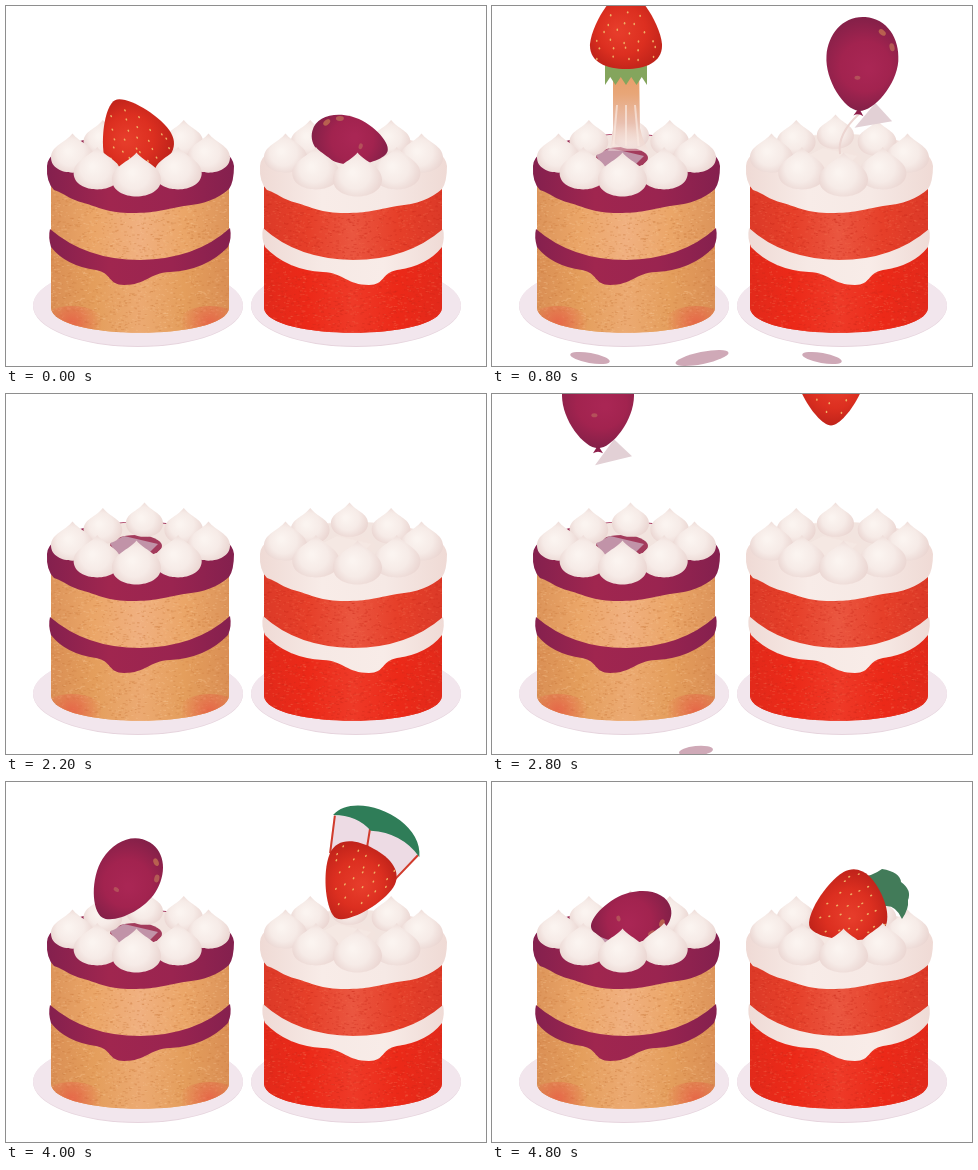
An HTML page with a canvas for the animation above (5 s loop, 480x360 px).

```html
<!DOCTYPE html>
<html lang="en">
<head>
<meta charset="utf-8">
<title>Cake swap</title>
<style>
  html, body { margin: 0; width: 100%; height: 100%; overflow: hidden; background: #fff; }
  canvas { display: block; }
</style>
</head>
<body>
<canvas id="stage" width="480" height="360"></canvas>
<script>
const W = 480, H = 360, LOOP = 5000;
const stage = document.getElementById('stage').getContext('2d');

const clamp = u => Math.max(0, Math.min(1, u));
const mix = (a, b, u) => a + (b - a) * u;

function layer(paint) {
  const canvas = document.createElement('canvas');
  canvas.width = W;
  canvas.height = H;
  paint(canvas.getContext('2d'));
  return canvas;
}

function random(seed) {
  return () => (seed = (seed * 16807) % 2147483647) / 2147483647;
}

function fillPath(c, d, fill) {
  c.fillStyle = fill;
  c.fill(new Path2D(d));
}

function strokePath(c, d, color, width) {
  c.strokeStyle = color;
  c.lineWidth = width;
  c.stroke(new Path2D(d));
}

function oval(c, x, y, rx, ry, fill, rot = 0) {
  c.fillStyle = fill;
  c.beginPath();
  c.ellipse(x, y, rx, ry, rot, 0, Math.PI * 2);
  c.fill();
}

function gradient(c, line, colors) {
  const g = line.length === 4 ? c.createLinearGradient(...line) : c.createRadialGradient(...line);
  colors.forEach((color, i) => g.addColorStop(i / (colors.length - 1), color));
  return g;
}

function at(c, x, y, degrees, paint) {
  c.save();
  c.translate(x, y);
  c.rotate(degrees * Math.PI / 180);
  paint();
  c.restore();
}

// Sponge colours run edge, body, glow; lean shifts the front cream sideways.
const cakes = [
  {
    x: 0, plate: 132, lean: -4, seed: 91,
    upper: ['#dc945a', '#eba668', '#f0b080'], lower: ['#da8f55', '#e49e5c', '#ecaa72'],
    specks: ['#c97a3c', '#f7c48f'], icing: ['#84204e', '#a0264f', '#9a2450', '#84204e'],
    hole: ['#a33b5c', '#c193a8']
  },
  {
    x: 213, plate: 350, lean: 4, seed: 491,
    upper: ['#dc3a28', '#e63f29', '#ea5640'], lower: ['#e22a1b', '#ec2918', '#ee3a28'],
    specks: ['#c92a1b', '#f0684c'], icing: ['#efdad5', '#f8ece8', '#f6e9e5', '#efdad5'],
    hole: ['#f3e4df', '#f5e8e3']
  }
];

function cream(c, x, y, r, tip) {
  const bottom = y + r * 0.8 + 5;
  const fill = gradient(c, [x - r * 0.2, y - r * 0.2, 2, x, y - 2, r * 1.15], ['#fbf4f0', '#f6ebe7', '#e8d1cd']);
  fillPath(c, `M${x} ${tip} C${x + 7} ${tip + 9} ${x + r} ${y - r * 0.45} ${x + r} ${y + 2}
    C${x + r} ${bottom} ${x - r} ${bottom} ${x - r} ${y + 2}
    C${x - r} ${y - r * 0.45} ${x - 7} ${tip + 9} ${x} ${tip}Z`, fill);
}

// Eight dollops sit on an oval ring; those with a positive sine are in front.
function creamRing(c, cake, steps) {
  for (const step of steps) {
    const angle = step * Math.PI / 4, sin = Math.sin(angle), cos = Math.cos(angle);
    const x = cake.x + 134.5 + 68 * Math.sign(cos) * Math.abs(cos) ** 1.5 + cake.lean * sin;
    const y = 149.5 + 22 * sin;
    cream(c, x, y, 21.5 + 3 * sin, y - 22 - 3 * sin);
  }
}

function cakeBase(c, cake) {
  const rand = random(cake.seed);
  const sponge = ([edge, body, glow]) => gradient(c, [44, 0, 223, 0], [edge, body, glow, body, edge]);
  oval(c, cake.plate, 300, 105, 41, '#e6d4dd');
  oval(c, cake.plate, 299.5, 105, 40.5, '#f2e6ed');

  c.save();
  c.translate(cake.x, 0);
  c.save();
  c.clip(new Path2D('M45 170 V302 C48 335 220 335 223 302 V170Z'));
  c.fillStyle = sponge(cake.upper);
  c.fillRect(40, 160, 190, 180);
  fillPath(c, 'M40 232 Q134 286 228 230 V340 H40Z', sponge(cake.lower));
  c.globalAlpha = 0.35;
  for (let i = 0; i < 2400; i++) {
    c.fillStyle = cake.specks[rand() < 0.5 ? 0 : 1];
    c.fillRect(44 + rand() * 180, 180 + rand() * 150, 1 + rand() * 2, 1);
  }
  c.globalAlpha = 1;
  if (cake.x === 0) {
    for (const x of [66, 204]) {
      oval(c, x, 317, 32, 17, gradient(c, [x, 317, 2, x, 317, 30], ['rgba(232,92,68,.75)', 'rgba(232,92,68,0)']));
    }
  }
  c.restore();

  const icing = gradient(c, [41, 0, 228, 0], cake.icing);
  c.save();
  if (cake.x) c.transform(-1, 0, 0, 1, 268, 0);
  fillPath(c, `M44 223 Q80 254 134 254 Q190 253 224 222 Q226 232 222 241 Q200 264 164 266
    C143 267 140 279 118 279 C102 279 106 267 90 264 Q60 260 45 241 Q42 231 44 223Z`, icing);
  c.restore();
  fillPath(c, `M41 160 C44 117 225 117 228 160 Q228 176 223 183 C212 193 198 198 178 200
    C155 204 150 207 126 207 C102 207 92 201 78 197 C62 193 60 188 48 184 Q40 176 41 160Z`, icing);
  oval(c, 134.5, 150, 64, 22, '#f2e4df');
  oval(c, 130, 152, 26, 11, cake.hole[0]);
  fillPath(c, 'M104 149 L118 142 L152 150 L138 164 L110 160Z', cake.hole[1]);
  c.restore();
  creamRing(c, cake, [6, 5, 7, 4, 0]);
}

const backLayer = layer(c => cakes.forEach(cake => cakeBase(c, cake)));
const frontLayer = layer(c => cakes.forEach(cake => creamRing(c, cake, [3, 1, 2])));

function strawberry(c, { x, y, degrees }) {
  const rand = random(77);
  at(c, x, y, degrees, () => {
    fillPath(c, 'M0 -41 C12 -41 34 -8 36 13 C37 31 20 38 0 38 C-20 38 -37 31 -36 13 C-34 -8 -12 -41 0 -41Z',
      gradient(c, [-8, 0, 4, 0, 0, 44], ['#e63c2a', '#dc2f20', '#bb2119']));
    for (let sy = -29; sy < 34; sy += 9) {
      const half = Math.min(30, (sy + 48) * 0.55);
      for (let sx = -half; sx <= half; sx += 14) {
        oval(c, sx + rand() * 5, sy + rand() * 5, 0.8, 1.2, '#eeb066');
      }
    }
  });
}

function grape(c, { x, y, rx, ry, degrees }) {
  at(c, x, y, degrees, () => {
    if (rx > 35) {
      fillPath(c, `M16 ${ry - 9} L-3 ${ry + 17} L34 ${ry + 8}Z`, '#e2d0d5');
      fillPath(c, `M0 ${ry - 3} L-5 ${ry + 5} Q0 ${ry + 2} 5 ${ry + 5}Z`, '#8c1c49');
    }
    fillPath(c, `M0 ${-ry} C${rx * 0.6} ${-ry} ${rx} ${-ry * 0.6} ${rx} ${-ry * 0.12}
      C${rx} ${ry * 0.4} ${rx * 0.4} ${ry} 0 ${ry} C${-rx * 0.4} ${ry} ${-rx} ${ry * 0.4} ${-rx} ${-ry * 0.12}
      C${-rx} ${-ry * 0.6} ${-rx * 0.6} ${-ry} 0 ${-ry}Z`,
      gradient(c, [rx * 0.2, ry * 0.1, 3, 0, 0, ry], ['#a92654', '#a2234f', '#832048']));
    oval(c, rx * 0.5, -ry * 0.7, 4, 2.5, '#b8604f', 0.6);
    oval(c, rx * 0.8, -ry * 0.4, 2.5, 4, '#b45a55', -0.3);
    oval(c, -rx * 0.1, ry * 0.3, 3, 2, '#b4505a');
  });
}

function exhaust(c, { x, y }, t) {
  const top = y + 34;
  c.globalAlpha = clamp((t - 200) / 500);
  fillPath(c, `M${x - 13} ${top} H${x + 13} L${x + 14} 122 Q${x + 18} 140 ${x + 24} 145
    H${x - 18} Q${x - 13} 136 ${x - 13} 122Z`,
    gradient(c, [0, top, 0, 146], ['#e79a61', '#e8a678', '#e9c0b0', 'rgba(246,230,226,.4)']));
  for (const dx of [-9, 0, 9]) {
    strokePath(c, `M${x + dx} ${top + 40} L${x + dx * 1.4} 140`, 'rgba(250,232,224,.7)', 2);
  }
  let skirt = `M${x + 21} ${top} H${x - 21}`;
  for (let i = 0; i <= 8; i++) skirt += ` L${x - 21 + i * 5.25} ${top + (i % 2 ? 12 : 20)}`;
  fillPath(c, skirt + 'Z', '#84a55d');
  c.globalAlpha = 1;
}

function leaf(c, x, y) {
  at(c, x, y, 0, () => {
    fillPath(c, 'M4 -35 Q20 -30 35 -41 Q53 -38 54 -28 Q65 -20 61 -10 Q62 -1 55 9 Q49 -5 38 -4 Q30 -12 4 -35Z', '#427b59');
  });
}

function parachute(c, { x, y, degrees }, t) {
  const lift = Math.max(0, (3800 - t) / 15);
  const size = 1 - 0.38 * clamp((t - 4000) / 400);
  const rim = -56 - lift;
  at(c, x, y, (degrees - 180) * 0.87, () => {
    c.scale(size, size);
    if (lift) {
      strokePath(c, `M-37 ${rim} Q-38 -45 -31 -26 M49 ${rim} Q50 -38 40 -22 M-12 -36 Q-4 -44 -6 ${rim}`, '#c93c2b', 2);
      strokePath(c, `M-3 -42 V${rim}`, '#4a3436', 4);
    } else {
      fillPath(c, 'M-47 -52 Q0 -74 47 -50 L34 -16 Q0 -46 -36 -16Z', '#eddbe4');
      strokePath(c, 'M-46 -52 L-35 -16 M46 -50 L34 -16 M-9 -56 L-2 -30', '#d13b2c', 2);
    }
    fillPath(c, `M-48 ${rim + 4} C-38 ${rim - 28} 36 ${rim - 30} 48 ${rim + 7}
      Q22 ${rim - 8} -7 ${rim + 3} Q-26 ${rim - 6} -48 ${rim + 4}Z`, '#2f7d58');
  });
}

// Take-off accelerates while the grape swells into a balloon.
function takeOff(t) {
  const u = clamp(t / 800), climb = (t / 800) ** 2.2;
  return {
    berry: { x: mix(127, 134, u), y: mix(131, 25, climb), degrees: mix(-26, 0, u) },
    bubble: {
      x: mix(344, 370, u), y: mix(135, 58, climb),
      rx: mix(24, 36, u), ry: mix(39, 47, u), degrees: mix(-75, 4, u)
    }
  };
}

// Both fruits brake on the way down and tilt as they settle.
function landing(t) {
  const left = (4800 - t) / 800, settle = clamp((t - 3400) / 1400);
  return {
    berry: { x: mix(339, 355, Math.sqrt(settle)), y: 128 - 10 * left - 18 * left ** 2, degrees: mix(180, 245, settle) },
    bubble: {
      x: mix(106, 139, settle), y: 136 - 29 * left - 9 * left ** 2,
      rx: mix(36, 25, settle), ry: mix(47, 41, settle), degrees: mix(0, 76, settle)
    }
  };
}

function shadows(c, t) {
  const color = '#cfa9b7', launching = t >= 400 && t < 1000;
  if (launching) for (const x of [98, 330]) oval(c, x, 352, 20, 5, color, 0.17);
  if (t >= 400 && t < 2200) oval(c, launching ? 210 : 202, launching ? 352 : 355, 27, 6, color, -0.2);
  if (t >= 2400 && t < 3800) oval(c, 204, 357, 17, 5, color, -0.1);
}

function draw(c, t) {
  c.fillStyle = '#fff';
  c.fillRect(0, 0, W, H);
  shadows(c, t);
  c.drawImage(backLayer, 0, 0);

  const rising = t < 1200;
  if (rising || t >= 2600) {
    const { berry, bubble } = rising ? takeOff(t) : landing(t);
    if (rising) exhaust(c, berry, t);
    else if (t < 4500) parachute(c, berry, t);
    else leaf(c, berry.x, berry.y);
    strawberry(c, berry);
    if (rising && t >= 600) strokePath(c, `M${bubble.x - 3} ${bubble.y + 50} Q345 128 348 148`, '#ecd5d1', 2);
    grape(c, bubble);
  }
  c.drawImage(frontLayer, 0, 0);
}

// The picture advances in 200 ms steps, doubled in pace during take-off.
function tick() {
  const t = performance.now() % LOOP;
  const step = t >= 400 && t < 1000 ? 100 : 200;
  draw(stage, Math.floor(t / step) * step);
  requestAnimationFrame(tick);
}
tick();
</script>
</body>
</html>
```
